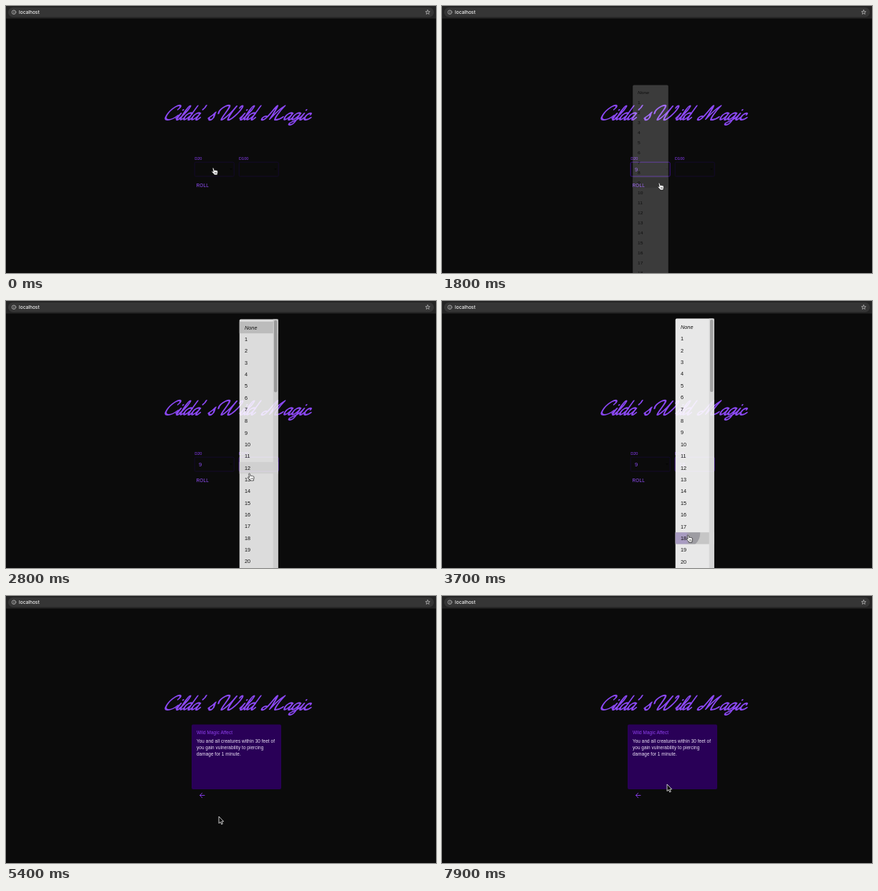
An HTML page for the animation above (8 s loop, 600 px wide and 373 px high).

```html
<!DOCTYPE html>
<html lang="en">
<head>
<meta charset="utf-8">
<title>Wild Magic</title>
<style>
html, body { margin: 0; width: 100%; height: 100%; overflow: hidden; background: #0b0b0b; }
svg { display: block; }
#stage { width: 100vw; height: 100vh; }
text { font-family: "Liberation Sans", Arial, sans-serif; white-space: pre; }
.url { font: 500 6.6px Inter, sans-serif; fill: #f2f2f2; }
.label { font-size: 5.6px; fill: #8b3df8; }
.value { font-size: 7.6px; fill: #8a4cf2; }
.item { font-size: 7.3px; fill: #111; }
.body { font-size: 6.4px; letter-spacing: .0107em; fill: #eee6f8; }
.line { fill: none; stroke-linecap: round; stroke-linejoin: round; }
</style>
</head>
<body>
<svg id="stage" viewBox="0 0 600 373">
  <defs>
    <linearGradient id="ink">
      <stop offset=".5" stop-color="#b9aad4"/>
      <stop offset=".65" stop-color="#adacb2"/>
    </linearGradient>
  </defs>
  <rect width="600" height="373" fill="#0b0b0b"/>

  <rect width="600" height="17.5" fill="#242424"/>
  <rect x="3" y="2" width="594" height="13.5" rx="6.5" fill="#353535"/>
  <g class="line" stroke="#c8c8c8" stroke-width=".7">
    <circle cx="11" cy="8.7" r="2.8"/>
    <path d="M11,8.5v1.7M11,7.1v.1"/>
    <path id="star"/>
  </g>
  <text class="url" x="18" y="10.9">localhost</text>

  <g id="title" class="line" role="img" aria-label="Cilda's Wild Magic" stroke="#8b48f4" stroke-width="2.2"></g>

  <g id="form">
    <text class="label" x="263.2" y="215.4">D20</text>
    <text class="label" x="325" y="215.4">D100</text>
    <rect id="box20" x="263.2" y="218.2" width="55" height="19.8" rx="1.5" fill="none"/>
    <rect id="box100" x="325.2" y="218.2" width="55" height="19.8" rx="1.5" fill="none"/>
    <path d="M312,227h4l-2,2zM374,227h4l-2,2z" fill="#040404"/>
    <text id="val20" class="value" x="269" y="230.9"></text>
    <text id="val100" class="value" x="331" y="230.9"></text>
    <text x="265.5" y="252.7" font-size="6.4" letter-spacing=".18" fill="#9650ff">ROLL</text>
  </g>

  <g id="card">
    <rect x="259" y="179.5" width="125" height="90.5" rx="2" fill="#290057"/>
    <text class="body" x="266" y="193.2" style="fill:#9040ee">Wild Magic Affect</text>
    <text class="body" x="266" y="205">You and all creatures within 30 feet of</text>
    <text class="body" x="266" y="214.2">you gain vulnerability to piercing</text>
    <text class="body" x="266" y="223.3">damage for 1 minute.</text>
    <path class="line" d="M277,278.5h-6.5M273.7,275.2l-3.3,3.3 3.3,3.3" stroke="#8238e0" stroke-width="1"/>
  </g>

  <g id="menus"></g>

  <path id="arrow" d="M0,0V9.6L2.2,7.6 3.7,11 5.3,10.3 3.8,7H6.7Z" fill="#080808" stroke="#f4f4f4" stroke-width=".8"/>
  <g id="hand" stroke="#111" stroke-width=".7" stroke-linejoin="round">
    <path d="M-.9,.6Q-.2,-.7 .8,.5L1.7,3.6 Q2.6,2.7 3.3,3.6 Q4.2,2.9 4.8,3.9 Q6,3.4 6.4,4.8 Q6.9,7 6,8.4V10H1.3V9.1L-2,5.7Q-2,4.5 -.9,4.9L.2,5.6Z" fill="#fff"/>
    <path d="M2.3,6v2.2M3.6,6v2.2M4.8,6v2.2" fill="none" stroke-width=".45"/>
  </g>
</svg>
<script>
const $ = id => document.getElementById(id);
const clamp = v => Math.min(1, Math.max(0, v));

function add(parent, tag, attrs, content = "") {
  const el = document.createElementNS("http://www.w3.org/2000/svg", tag);
  for (const k in attrs) el.setAttribute(k, attrs[k]);
  el.textContent = content;
  return parent.appendChild(el);
}

$("star").setAttribute("d", "M" + Array.from({ length: 10 }, (_, i) => {
  const r = i % 2 ? 1.4 : 3.2, a = i * Math.PI / 5;
  return [588.4 + r * Math.sin(a), 8.8 - r * Math.cos(a)].map(v => v.toFixed(2));
}).join("L") + "Z");

// Script lettering: upright pen strokes on a zero baseline, slanted when placed.
const bowl = "M8.5,-8.5C5,-11.5 1,-8 1,-4C1,1.5 5.5,1 8.5,-8";
const pen = {
  C: "M12,-14.5C15,-19 11,-22.5 6,-18C0,-12 -1,0 7,0C12,0 15,-3 17,-6",
  W: "M-3,-9C-6,-14 0,-21 5,-20C9,-19 5,-6 6,-1.5C6.5,1 8,0 9.5,-2C13,-7 15,-14 16,-19C14,-10 14,-1 16,0C20,1 25,-10 25,-16C25,-20.5 21.5,-20.5 22,-16.5",
  M: "M3,-5C-2,-5 -2,1 2,0C6,-1 7,-14 9,-19C10,-21 11,-18 10.5,-1C13,-9 16,-16 20,-19.5C17,-11 16,0 19,0Q24,0 27,-4",
  a: bowl + "M8.5,-9C7.5,-3 7.2,0 9,0Q10.5,0 12,-3",
  d: bowl + "M9.3,-19.5C8,-6 7.2,0 9,0Q10.5,0 12,-3",
  g: bowl + "M8.5,-9L8,2C7.5,8 1,8 1.5,5C2,3 8,1 11.5,-3",
  i: "M0,-2.5Q2,-6 2.5,-9C1.5,-3 1.2,0 3,0Q4.5,0 6,-3M2.6,-13.5v-.4",
  l: "M0,-2.5C4,-8 6,-19.5 3.7,-19.5C1.5,-19.5 1,-8 1.5,-3C1.8,0 3.5,1 6,-3",
  c: "M6.5,-7C7.5,-10.5 1,-9.5 1,-4C1,1 6,1 9.5,-3",
  s: "M0,-2.5Q4,-6 5,-10.5C4.5,-6 8.5,-4 6,-1C4.5,1 2,0 1.5,-1.5",
  "'": "M2,-20Q2.6,-17 .8,-14.5"
};
const starts = [219, 236, 241, 246, 257, 265, 281, 294, 325, 330, 334, 357, 386, 397, 408, 414];
[..."Cilda'sWildMagic"].forEach((ch, i) =>
  add($("title"), "path", { d: pen[ch], transform: `translate(${starts[i]} 159) skewX(-32)` }));

const ROW = 16.4, PIVOT = 237, SPAN = 430;

function makeMenu(opts) {
  const { x, top, rows } = opts, w = 54, h = 441.5 - top;
  const g = add($("menus"), "g", {});
  add(g, "rect", { x, y: top, width: w, height: h, rx: 1.8, fill: "#fff" });
  const fill = () => add(g, "rect", { x, width: w, height: ROW });
  const selected = fill(), hover = fill();
  selected.setAttribute("fill", "#dadada");
  hover.setAttribute("fill", "#f1f1f1");
  const clip = add(g, "svg", { x, width: w, height: ROW });
  const ripple = add(clip, "circle", { fill: "url(#ink)" });
  for (let i = 0; i < rows; i++)
    add(g, "text", { class: "item", x: x + 7.3, y: top + 3.4 + (i + .5) * ROW + 2.6, ...(i ? {} : { "font-style": "italic" }) }, i || "None");
  if (opts.scroll) {
    add(g, "rect", { x: x + 47, y: top, width: 7, height: h, fill: "#ededed" });
    add(g, "rect", { x: x + 48.3, y: top + 1.5, width: 4.4, height: 101, rx: 2.2, fill: "#b2b2b2" });
  }
  return { ...opts, w, g, selected, hover, clip, ripple };
}

const menus = [
  makeMenu({ x: 264, top: 89.3, rows: 21, open: 350, click: 1500, pick: 9 }),
  makeMenu({ x: 325.7, top: 24.6, rows: 25, open: 2550, click: 3550, pick: 18, scroll: true })
];

// cubic-bezier(.4, 0, .2, 1)
function ease(x) {
  x = clamp(x);
  let lo = 0, hi = 1, u = .5;
  for (let i = 0; i < 20; i++) {
    u = (lo + hi) / 2;
    if (1.2 * u * (1 - u) ** 2 + .6 * u * u * (1 - u) + u ** 3 < x) lo = u; else hi = u;
  }
  return 3 * u * u - 2 * u ** 3;
}

function drawMenu(m, t, px, py) {
  const close = m.click + 75, closing = t >= close;
  const age = t - (closing ? close : m.open);
  const shown = t >= m.open && t < close + SPAN;
  m.g.style.display = shown ? "" : "none";
  if (!shown) return;
  const alpha = closing ? 1 - ease(age / SPAN) : ease(age / SPAN);
  const grow = closing ? 1 - ease((age / SPAN - .333) / .666) : ease(age / SPAN / .666);
  const cx = m.x + m.w / 2;
  m.g.setAttribute("opacity", alpha);
  m.g.setAttribute("transform",
    `translate(${cx} ${PIVOT}) scale(${.75 + .25 * grow} ${.5625 + .4375 * grow}) translate(${-cx} ${-PIVOT})`);

  const rowY = i => m.top + 3.4 + i * ROW;
  const over = Math.floor((py - rowY(0)) / ROW);
  m.selected.setAttribute("y", rowY(closing ? m.pick : 0));
  m.hover.setAttribute("y", rowY(over));
  m.hover.style.display = !closing && over > 0 && px > m.x && px < m.x + m.w ? "" : "none";

  const wave = t - m.click;
  m.clip.setAttribute("y", rowY(m.pick));
  m.ripple.setAttribute("cx", m.pick === 18 ? 14.5 : 36);
  m.ripple.setAttribute("cy", 1.5);
  m.ripple.setAttribute("r", 20 * clamp(wave / 150));
  m.ripple.setAttribute("opacity", 1 - clamp((wave - 150) / 150));
}

// time, x, y of the pointer tip
const route = [
  [0, 289, 226], [400, 289, 226], [800, 292, 234], [1200, 304, 246], [1400, 302.5, 248],
  [1900, 303, 247], [2400, 339, 227.5], [2650, 339, 227.5], [3300, 343, 327], [3700, 343, 327],
  [3900, 300.5, 292], [4200, 278, 250], [4800, 277, 249], [5300, 297, 308], [5400, 297, 308],
  [5600, 292, 308], [5700, 290.5, 308], [5850, 290.5, 308], [6300, 304, 244], [6700, 328, 222],
  [6850, 328, 222], [7300, 345, 226], [7700, 328, 238], [7900, 314, 263], [8000, 314, 263]
];

function pointer(t) {
  const i = route.findIndex(p => p[0] > t);
  const a = route[i - 1], b = route[i], k = (t - a[0]) / (b[0] - a[0]);
  const s = k * k * (3 - 2 * k);
  return [a[1] + (b[1] - a[1]) * s, a[2] + (b[2] - a[2]) * s];
}

const ROLLED = 4800;

function draw(now) {
  const t = Math.floor(now % 8000 / 100) * 100;
  const [x, y] = pointer(t);
  const [m20, m100] = menus;
  menus.forEach(m => drawMenu(m, t, x, y));

  const border = (id, on) => $(id).setAttribute("stroke", on ? "#3d1188" : "#140a2b");
  border("box20", t >= m20.open && t < 2650);
  border("box100", t >= 2650);
  $("val20").textContent = t >= m20.click + 75 ? m20.pick : "";
  $("val100").textContent = t >= m100.click + 75 ? m100.pick : "";
  $("form").style.display = t < ROLLED ? "" : "none";
  $("card").style.display = t < ROLLED ? "none" : "";

  const pointing = t < 3800 || (t >= 4100 && t < ROLLED);
  $("hand").style.display = pointing ? "" : "none";
  $("arrow").style.display = pointing ? "none" : "";
  $(pointing ? "hand" : "arrow").setAttribute("transform", `translate(${x} ${y})`);
}

const start = performance.now();
(function loop() {
  draw(performance.now() - start);
  requestAnimationFrame(loop);
})();
</script>
</body>
</html>
```
